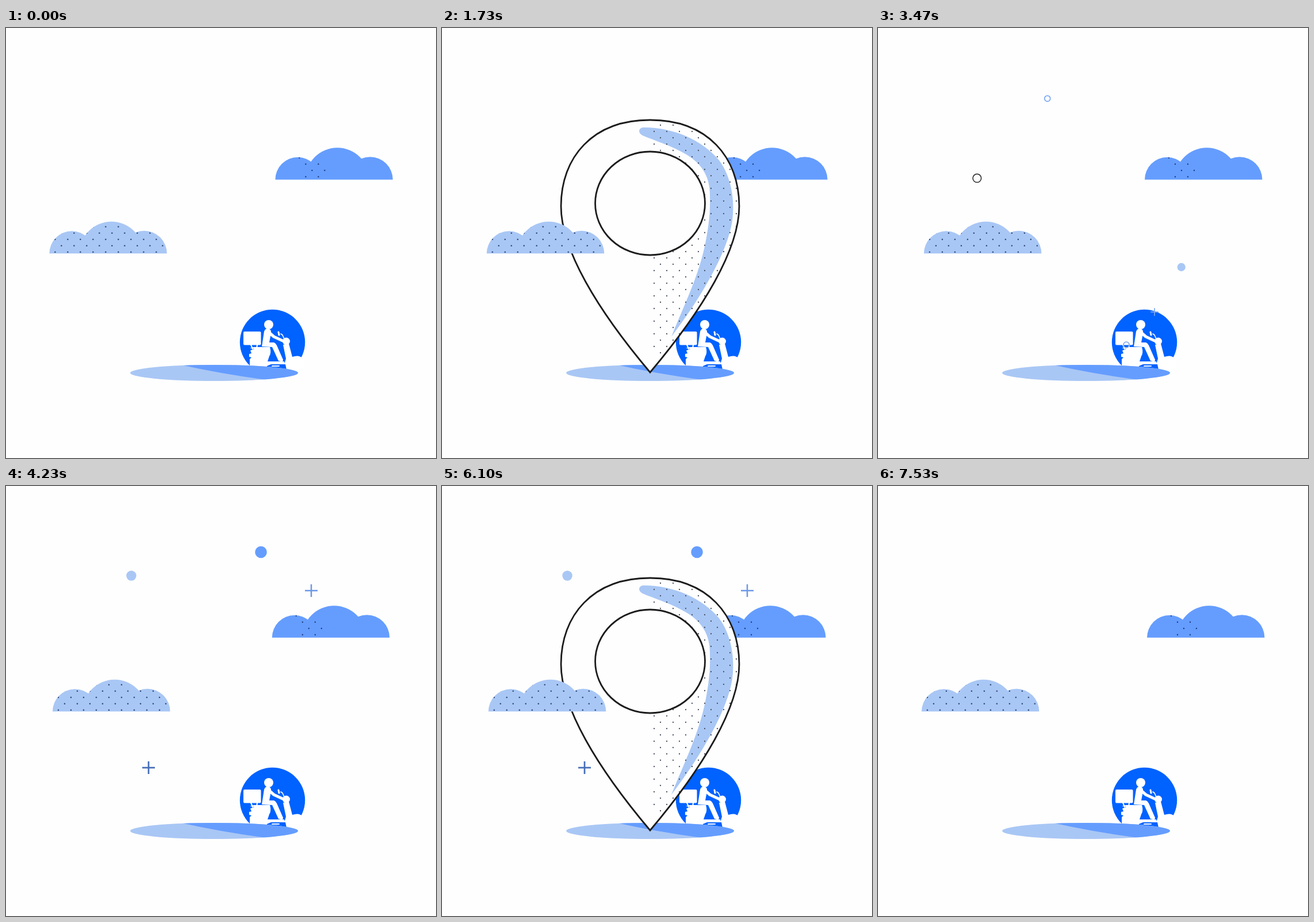
These frames come from a looping animation (748 by 748 pixels, 7.56 s). An HTML page with a canvas:

```html
<!DOCTYPE html>
<html lang="en">
<head>
<meta charset="utf-8">
<title>Delivery pin</title>
<style>
html, body { margin: 0; width: 100%; height: 100%; overflow: hidden; background: #fefefe; }
canvas { display: block; }
</style>
</head>
<body>
<canvas id="stage" width="748" height="748"></canvas>
<script>
const ctx = document.getElementById('stage').getContext('2d');
const PAPER = '#fefefe', LIGHT = '#a9c7f5', MID = '#659dff', BLUE = '#0062ff', INK = '#1c1c1c';
const TAU = Math.PI * 2;
const CYCLE = 3780, HALF = CYCLE / 2;

const clamp = v => Math.max(0, Math.min(1, v));
const ramp = (t, a, b) => clamp((t - a) / (b - a));
const smooth = p => p * p * (3 - 2 * p);

function disc(x, y, r, color) {
  ctx.fillStyle = color;
  ctx.beginPath();
  ctx.arc(x, y, r, 0, TAU);
  ctx.fill();
}

function ring(x, y, r, color, width) {
  ctx.strokeStyle = color;
  ctx.lineWidth = width;
  ctx.beginPath();
  ctx.arc(x, y, r, 0, TAU);
  ctx.stroke();
}

function line(color, width, ...p) {
  ctx.strokeStyle = color;
  ctx.lineWidth = width;
  ctx.beginPath();
  for (let i = 0; i < p.length; i += 2) ctx.lineTo(p[i], p[i + 1]);
  ctx.stroke();
}

function plus(x, y, r, color, width) {
  line(color, width, x - r, y, x + r, y);
  line(color, width, x, y - r, x, y + r);
}

// Staggered dot grid, rows 11 apart
function dots(x0, y0, x1, y1, r, color) {
  ctx.fillStyle = color;
  for (let y = y0, row = 0; y <= y1; y += 11, row++)
    for (let x = x0 + (row % 2) * 11; x <= x1; x += 22) {
      ctx.beginPath();
      ctx.arc(x, y, r, 0, TAU);
      ctx.fill();
    }
}

// Origin is the left end of the flat base
function cloud(x, y, color, pattern) {
  ctx.save();
  ctx.translate(x, y);
  ctx.beginPath();
  ctx.rect(-5, -70, 220, 70);
  ctx.clip();
  ctx.beginPath();
  for (const [cx, r] of [[39, 39], [108, 55.5], [165, 39.5]]) {
    ctx.moveTo(cx + r, 0);
    ctx.arc(cx, 0, r, 0, TAU);
  }
  ctx.fillStyle = color;
  ctx.fill();
  ctx.clip();
  pattern();
  ctx.restore();
}

const fullDots = () => dots(10, -46.5, 206, 0, 1.3, '#2f4a78');
function fewDots() {
  for (const [x, y] of [[42, -38], [53, -27], [75, -27], [64, -16], [86, -16], [53, -5], [75, -5]])
    disc(x, y, 1.2, '#1f3c80');
}

function ground() {
  ctx.save();
  ctx.beginPath();
  ctx.ellipse(362, 600, 146, 14, 0, 0, TAU);
  ctx.fillStyle = LIGHT;
  ctx.fill();
  ctx.clip();
  ctx.fillStyle = MID;
  ctx.beginPath();
  ctx.moveTo(300, 585);
  ctx.quadraticCurveTo(370, 601, 452, 612);
  ctx.lineTo(520, 612);
  ctx.lineTo(520, 580);
  ctx.fill();
  ctx.restore();
}

const torso = new Path2D('M449 528Q451 522 457 523Q462 525 461 531L458 547L466 547Q469 548 471 552L482 577Q482 581 478 580L474 579L463 555L445 554Z');
const rear = new Path2D('M424 588V576L427 573L423 572V567L427 566L425 561L432 558L424 557L431 555H459Q462 565 458 571L455 580H484V585H461L454 588Z');
const front = new Path2D('M482 551L492 549L498 572Q510 568 515 574Q521 580 519 594H488L486 585H474V582H485L487 575Z');

function rider() {
  ctx.save();
  ctx.beginPath();
  ctx.rect(400, 480, 130, 113);
  ctx.clip();
  disc(463.5, 546.5, 56.7, BLUE);
  ctx.fillStyle = '#fff';
  ctx.beginPath();
  ctx.roundRect(413, 528, 30.5, 23.5, 2);
  ctx.fill();
  ctx.fillRect(412, 588, 42, 8);
  ctx.fill(rear);
  ctx.fill(torso);
  ctx.fill(front);
  disc(457, 516, 8, '#fff');
  disc(487.5, 545, 6.5, '#fff');
  ctx.lineCap = ctx.lineJoin = 'round';
  line('#fff', 5, 458, 530, 466, 537, 481, 544);
  line('#fff', 2, 426, 551, 429, 558);
  line('#fff', 2, 437, 551, 436, 558);
  line('#fff', 1.6, 484, 541, 481, 534, 478, 532);
  line('#fff', 3, 474, 529, 475, 534);
  line('#fff', 2, 463, 588, 475, 588);
  ctx.restore();
}

const pin = new Path2D('M362 160C262 160 207 225 207 310C207 385 270 490 362 599C454 490 517 385 517 310C517 225 462 160 362 160Z');
const shine = new Path2D('M349 173C400 172 452 194 482 230C503 258 510 300 505 335C497 390 450 470 399 537C422 480 447 430 458 375C464 345 467 320 466 290C466 262 455 238 425 220C400 205 370 196 349 187C341 183 341 175 349 173Z');
const hole = new Path2D();
hole.ellipse(362, 305, 95.5, 90, 0, 0, TAU);

function drawPin(t) {
  const gone = ramp(Math.abs(t - HALF), 730, 1125);
  if (gone >= 1) return;
  const sx = 1 - gone, sy = 1 - 0.585 * gone;
  const lift = 63 * gone * Math.pow(1 - gone, 1.45);
  const place = new DOMMatrix([sx, 0, 0, sy, 362 - 362 * sx, 599 - lift - 599 * sy]);
  const outline = path => {
    const p = new Path2D();
    p.addPath(path, place);
    ctx.strokeStyle = INK;
    ctx.lineWidth = Math.max(0.8, 2.8 * Math.sqrt(sx * sy));
    ctx.stroke(p);
  };
  ctx.save();
  ctx.transform(place.a, 0, 0, place.d, place.e, place.f);
  ctx.fillStyle = PAPER;
  ctx.fill(pin);
  ctx.clip(pin);
  ctx.fillStyle = LIGHT;
  ctx.fill(shine);
  dots(369, 180 - 11 * 2, 514, 575, 1.15, '#4a5260');
  ctx.fillStyle = PAPER;
  ctx.fill(hole);
  ctx.restore();
  outline(pin);
  outline(hole);
}

const bursts = [
  [[disc, 218, 156, 8.7, LIGHT], [disc, 443.5, 115, 10.3, MID],
   [plus, 531, 182, 11, '#6c98e6', 2.5], [plus, 248, 490, 11, '#456db8', 2.7]],
  [[ring, 294.7, 122.7, 8, '#72a1f2', 2.6], [ring, 172.3, 261.3, 11.7, '#222', 2.4],
   [disc, 527.7, 416, 11.5, LIGHT], [plus, 481, 494, 11, '#7ba7ee', 2.8],
   [ring, 432, 551, 8, '#7ba3e2', 2.6]]
];

function sparkle(t) {
  bursts.forEach((shapes, i) => {
    const local = t - i * HALF / 2;
    const size = smooth(ramp(local, 160, 390)) * (1 - smooth(ramp(local, 540, 770)));
    if (size <= 0) return;
    for (const [draw, x, y, ...style] of shapes) {
      ctx.save();
      ctx.translate(x, y);
      ctx.scale(size, size);
      draw(0, 0, ...style);
      ctx.restore();
    }
  });
}

function frame() {
  const t = performance.now() % CYCLE;
  const beat = t % HALF;
  const phase = (t - 30 + HALF) % HALF / HALF;
  const drift = 13.5 * (1 - Math.abs(2 * phase - 1));
  ctx.fillStyle = PAPER;
  ctx.fillRect(0, 0, 748, 748);
  cloud(468.8 - drift, 263.8, MID, fewDots);
  rider();
  ground();
  drawPin(t);
  cloud(75 + drift, 392.3, LIGHT, fullDots);
  sparkle(beat);
  requestAnimationFrame(frame);
}
frame();
</script>
</body>
</html>
```
